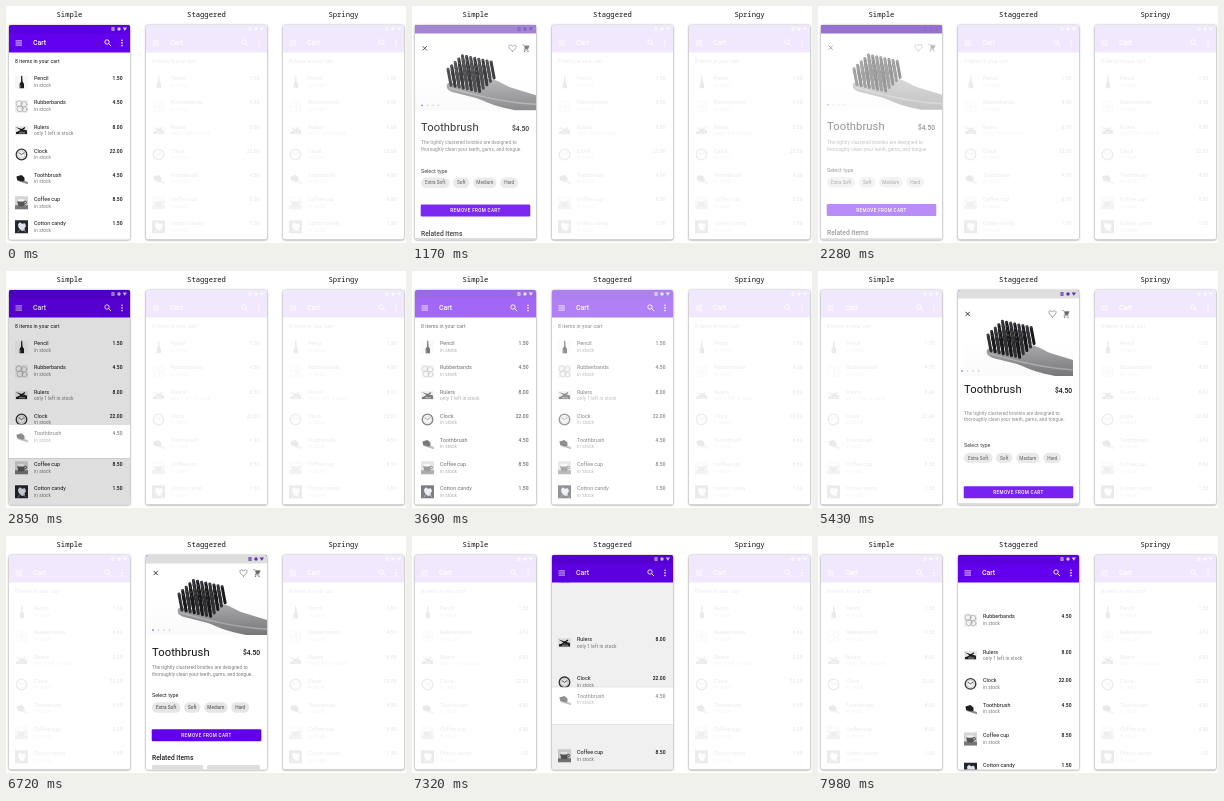
Animation, 400 px wide and 237 px high, one loop 8000 ms. Source, as an HTML page:

```html
<!DOCTYPE html>
<html lang="en">
<head>
<meta charset="utf-8">
<title>Cart transitions</title>
<style>
  html, body { margin: 0; height: 100%; overflow: hidden; background: #fff; }
  svg { display: block; width: 100vw; height: 100vh; font-family: Roboto, sans-serif; }
  .label { font: 7.2px "Noto Sans Mono", monospace; text-anchor: middle; fill: #111; }
  .name { font-size: 5.4px; fill: #111; }
  .note { font-size: 4.7px; letter-spacing: .08px; fill: #777; }
  .cost { font-size: 5px; font-weight: 500; text-anchor: end; fill: #111; }
  .line { fill: none; stroke-linecap: round; stroke-linejoin: round; }
</style>
</head>
<body>
<svg id="stage" viewBox="0 0 400 237" xmlns="http://www.w3.org/2000/svg"></svg>
<script>
const LOOP = 8000, W = 121, TOP = 19, BOTTOM = 233.5;
const PITCH = 24.1, ROW_TOP = 64, PAGE_TOP = 28, PICK = 4, GHOST = .09;
const CARD_ROW = ROW_TOP + PICK * PITCH;

const items = [
  ['Pencil', 'in stock', '1.50'],
  ['Rubberbands', 'in stock', '4.50'],
  ['Rulers', 'only 1 left in stock', '8.00'],
  ['Clock', 'in stock', '22.00'],
  ['Toothbrush', 'in stock', '4.50'],
  ['Coffee cup', 'in stock', '8.50'],
  ['Cotton candy', 'in stock', '1.50']
];

// Thumbnails, drawn in a 13 by 13 box
const thumbs = [
  `<path d="M0 0h13v13H0z" fill="#f6f6f6"/><path d="M6.2 0h1l.4 6 1.4 2v4.5H4.6V8L6 6z" fill="#1b1b1b"/><path d="M5.4 9v3" stroke="#777" stroke-width=".7"/>`,
  `<path d="M0 0h13v13H0z" fill="#f1f1f1"/><g class="line" stroke="#a8a8a8" stroke-width=".7"><circle cx="4" cy="4" r="3"/><circle cx="9" cy="4.5" r="2.8"/><circle cx="5" cy="9" r="3"/><circle cx="9.5" cy="9.5" r="2.6"/></g>`,
  `<path d="M0 2h13v9H0z" fill="#e9e9e9"/><path d="M.5 3.2L12 6.6v3.6H1V8l6-.8z" fill="#222"/><path d="M2 9.2l8-5.6" stroke="#111" stroke-width="1.2"/><path d="M4 8.9h6" stroke="#ccc" stroke-width=".7"/>`,
  `<circle cx="6.5" cy="6.5" r="5.3" fill="#f4f4f4" stroke="#333" stroke-width="1.3"/><circle cx="6.5" cy="6.5" r="3.6" class="line" stroke="#999" stroke-width=".6" stroke-dasharray=".5 1.4"/><path class="line" d="M4.2 5l2.3 1.6 2.6-1.9" stroke="#222" stroke-width=".7"/>`,
  `<path d="M2 6.2l9.5 3.2 1.5.8v2L2.5 9z" fill="#8c8c8c"/><path d="M1.4 4.4l5-1.4 3 2.4.2 3-2 1-5.4-1.6z" fill="#1f1f22"/>`,
  `<path d="M0 0h13v13H0z" fill="#d4d4d4"/><path d="M0 9h13v4H0z" fill="#777"/><path d="M2 4h8l-1 6H3.4z" fill="#555"/><ellipse cx="6" cy="4" rx="4" ry="1.3" fill="#f2f2f2"/><path class="line" d="M10 5q2.6 0 1.2 2.2l-1.7.8" stroke="#444"/>`,
  `<path d="M0 0h13v13H0z" fill="#23262e"/><path d="M3 4l2-2 2 1.5 3-.5 1 3-1.5 2 .5 2-3 .6L5 9 3.4 7z" fill="#dfe3ea"/><path d="M5 9l-2 3M8 9l3 3" stroke="#8b909b" stroke-width=".8"/>`
];

const clamp = v => Math.min(1, Math.max(0, v));
const ramp = (t, a, b) => clamp((t - a) / (b - a));
const ease = x => x < .5 ? 4 * x ** 3 : 1 - 4 * (1 - x) ** 3;
const glide = (t, a, b) => ease(ramp(t, a, b));
const mix = (a, b, p) => a + (b - a) * p;
const text = (x, y, s, attrs = '') => `<text x="${x}" y="${y}" ${attrs}>${s}</text>`;

const row = ([name, note, cost], i) => {
  const y = ROW_TOP + i * PITCH;
  return `<g transform="translate(6 ${y + 5.7})">${thumbs[i]}</g>` +
    text(25, y + 10.3, name, 'class="name"') +
    text(25, y + 17, note, 'class="note"') +
    text(113.5, y + 10.3, cost, 'class="cost"');
};

const statusIcons = color => `<g fill="${color}"><path d="M102.5 21.3h3v3.4h-3zm1 1v1.4h1v-1.4z" fill-rule="evenodd"/><circle cx="110" cy="23" r="1.7"/><path d="M113.6 21.5h4.4l-2.2 3.2z"/></g>`;

const header = `
  <path d="M0 19h${W}v27.5H0z" fill="#6200ee"/><path d="M0 19h${W}v8.5H0z" fill="#5900dc"/>
  ${statusIcons('#d9c8fa')}
  <path d="M6.5 34.9h6.5M6.5 37h6.5M6.5 39.1h6.5" stroke="#fff" stroke-width=".8"/>
  ${text(24, 39.4, 'Cart', 'font-size="6.9" font-weight="500" fill="#fff"')}
  <circle cx="98" cy="36" r="2.2" fill="none" stroke="#fff" stroke-width=".9"/><path d="M99.6 37.6l2.5 2.5" stroke="#fff" stroke-width="1"/>
  <g fill="#fff"><circle cx="113" cy="34.2" r=".8"/><circle cx="113" cy="36.9" r=".8"/><circle cx="113" cy="39.6" r=".8"/></g>`;

function brush() {
  let tufts = '';
  for (let j = 4; j >= 0; j--) for (let i = 0; i < 8; i++) {
    const x = 33 + i * 4.1 + j * 3.6, y = 30 + i * .9 - j * 3.4;
    tufts += `<path d="M${x} ${y}l3 16" stroke="${(i + j) % 2 ? '#19191c' : '#2e2e33'}" stroke-width="3"/>` +
      `<circle cx="${x}" cy="${y}" r=".8" fill="#4c4c52"/>`;
  }
  return `<path d="M32 45C34 42 40 44 48 46L74 40C82 40 86 44 95 48L121 56V71H100C85 68 76 65 62 59L38 53C32 51 31 48 32 45Z" fill="url(#handle)"/>
    <path class="line" d="M35 49L62 56C80 60 95 64 121 65" stroke="#c4c4c6" stroke-width="1.4" opacity=".6"/>
    <g class="line">${tufts}</g>`;
}

const chip = ([x, w, s]) => `<rect x="${x}" y="166.3" width="${w}" height="10.4" rx="5.2" fill="#e6e6e6"/>` +
  text(x + w / 2, 173.2, s, 'font-size="4.7" text-anchor="middle" fill="#444"');

const pageParts = id => ({
  photo: `<g clip-path="url(#photo${id})"><path d="M0 28h${W}v71.5H0z" fill="url(#paper)"/><g transform="translate(0 28)">${brush()}</g></g>
    ${[0, 1, 2, 3].map(i => `<circle cx="${7 + i * 5.5}" cy="94" r=".7" fill="${i ? '#bbb' : '#6200ee'}"/>`).join('')}`,
  close: `<path d="M7.6 34.9l4.2 4.2m0-4.2l-4.2 4.2" stroke="#222" stroke-width=".9"/>`,
  icons: `<path class="line" d="M97.5 40.2C92 36 94 33.4 95.6 33.8q1.3.2 1.9 1.4q.6-1.2 1.9-1.4C101 33.4 103 36 97.5 40.2z" stroke="#666" stroke-width=".6"/>
    <path d="M107.3 33.6h1.4l.5 1h5l-1.5 3.3h-3.2l-.6 1h4.5" fill="none" stroke="#666" stroke-width=".6"/><path d="M109.3 34.8h4.8l-1.4 2.9h-2.9z" fill="#666"/><circle cx="109.5" cy="40.2" r=".7" fill="#666"/><circle cx="113" cy="40.2" r=".7" fill="#666"/>`,
  title: text(6, 119.5, 'Toothbrush', 'font-size="11.2" letter-spacing=".08" fill="#111"') +
    text(114, 119.4, '$4.50', 'font-size="6.7" font-weight="500" text-anchor="end" fill="#111"'),
  about: text(6, 133.2, 'The tightly clustered bristles are designed to', 'class="note"') +
    text(6, 139.9, 'thoroughly clean your teeth, gums, and tongue.', 'class="note"'),
  type: text(6, 161.4, 'Select type', 'font-size="5.4" fill="#222"'),
  chips: [[6, 28.5, 'Extra Soft'], [38, 16.5, 'Soft'], [58.2, 23.3, 'Medium'], [85.2, 18, 'Hard']].map(chip).join(''),
  button: `<rect x="5.7" y="193.2" width="109.6" height="12" rx="1.2" fill="#6200ee"/>` +
    text(60.5, 200.9, 'REMOVE FROM CART', 'font-size="4.6" font-weight="500" letter-spacing=".35" text-anchor="middle" fill="#fff"'),
  related: text(6, 224.3, 'Related Items', 'font-size="6.7" font-weight="500" fill="#222"') +
    `<rect x="6" y="229" width="51" height="20" rx="1.5" fill="#ddd"/><rect x="61" y="229" width="53" height="20" rx="1.5" fill="#ddd"/>`
});

function phoneMarkup(x, label, id) {
  const parts = Object.entries(pageParts(id))
    .map(([key, body]) => `<g id="${key}${id}">${body}</g>`).join('');
  return `${text(x + 60.5, 11, label, 'class="label"')}
  <g transform="translate(${x} 0)">
    <rect y="19.6" width="${W}" height="${BOTTOM - TOP}" rx="2" fill="#777" filter="url(#soft)"/>
    <rect y="${TOP}" width="${W}" height="${BOTTOM - TOP}" rx="2" fill="#fff"/>
    <clipPath id="card${id}"><rect id="cut${id}" width="${W}"/></clipPath>
    <clipPath id="photo${id}"><rect id="crop${id}" y="28" height="71.5"/></clipPath>
    <g id="screen${id}" clip-path="url(#phone)">
      <path d="M0 19h${W}v215H0z" fill="#fff"/>
      <g id="count${id}">${text(6, 57, '8 items in your cart', 'font-size="5.1" letter-spacing=".06" fill="#111"')}</g>
      ${items.map((item, i) => `<g id="row${i}${id}">${row(item, i)}</g>`).join('')}
      ${header}
      <g id="status${id}"><path d="M0 19h${W}v9H0z" fill="#fff"/>${statusIcons('#6a35c8')}</g>
      <path id="scrim${id}" d="M0 19h${W}v215H0z"/>
      <path id="veil${id}" d="M0 27.5h${W}v204H0z" fill="#fff"/>
      <g id="sheet${id}">
        <rect id="edge${id}" x="-1" width="${W + 2}" fill="none" stroke="#000"/>
        <g clip-path="url(#card${id})">
          <path d="M0 19h${W}v215H0z" fill="#fff"/>
          <g id="pick${id}">${row(items[PICK], PICK)}</g>${parts}
        </g>
      </g>
    </g>
  </g>`;
}

const stage = document.getElementById('stage');
stage.innerHTML = `<defs>
  <filter id="soft" x="-10%" y="-10%" width="120%" height="120%"><feGaussianBlur stdDeviation="1"/></filter>
  <clipPath id="phone"><rect y="${TOP}" width="${W}" height="${BOTTOM - TOP}" rx="2"/></clipPath>
  <linearGradient id="handle" x2="0" y2="1"><stop stop-color="#a9a9ab"/><stop offset="1" stop-color="#77777a"/></linearGradient>
  <linearGradient id="paper" x2="0" y2="1"><stop offset=".5" stop-color="#fff"/><stop offset="1" stop-color="#fafafa"/></linearGradient>
</defs>` + phoneMarkup(3, 'Simple', 'A') + phoneMarkup(140, 'Staggered', 'B') + phoneMarkup(277, 'Springy', 'C');

const parts = {};
stage.querySelectorAll('[id]').forEach(el => parts[el.id] = el);
const set = (id, attrs) => { for (const k in attrs) parts[id].setAttribute(k, attrs[k]); };
const place = (id, y, opacity = 1, x = 0) => set(id, { transform: `translate(${x} ${y})`, opacity });

// open: card growth, spread: distance of rows from the picked one
function drawPhone(id, { alpha = 1, open = 0, spread = 0, scrim = 0, status = 0, pick = 1, page = {} }) {
  set('screen' + id, { opacity: alpha });
  items.forEach((_, i) => {
    const d = i - PICK;
    place(`row${i}${id}`, spread * (d < 0 ? d ** 3 : 10.5 * d));
  });
  place('count' + id, spread * -125);
  set('status' + id, { opacity: status });
  set('scrim' + id, { opacity: scrim });
  const veil = ramp(open, .75, .95);
  set('veil' + id, { opacity: veil });
  set('sheet' + id, { display: open > 0 ? 'inline' : 'none' });
  if (!open) return;

  const top = mix(CARD_ROW, PAGE_TOP, open);
  const height = mix(CARD_ROW + PITCH, BOTTOM + .5, open) - top;
  set('cut' + id, { y: top, height });
  set('edge' + id, { y: top, height, 'stroke-opacity': .16 * (1 - veil) });
  place('pick' + id, top - CARD_ROW, pick);
  const inset = page.inset || 0;
  set('crop' + id, { x: 1.5 * inset, width: W - 2 * inset });
  for (const key of ['photo', 'close', 'icons', 'title', 'about', 'type', 'chips', 'button', 'related']) {
    const [y, opacity] = page.at(key, top - PAGE_TOP);
    place(key + id, y, opacity, key === 'photo' || key === 'icons' ? -inset / 2 : 0);
  }
}

function simple(t) {
  const back = t >= 2070;
  const fade = back ? 1 - ramp(t, 2070, 2450) : ramp(t, 700, 1260);
  return {
    alpha: mix(1, GHOST, ramp(t, 3570, 3840)),
    open: back ? 1 - glide(t, 2070, 3090) : glide(t, 300, 1410),
    scrim: .13 * ramp(t, 300, 650) * (1 - ramp(t, 2850, 3090)),
    status: back ? 1 - ramp(t, 2070, 2500) : ramp(t, 810, 1410),
    pick: back ? ramp(t, 2600, 3090) : 1 - ramp(t, 300, 650),
    page: { at: (key, shift) => [shift, fade] }
  };
}

const lag = { about: 15.6, type: 21.6, chips: 23, button: 33, related: 38 };

function staggered(t) {
  const back = t >= 6720;
  const open = back ? 1 - glide(t, 6720, 7530) : glide(t, 4387, 5732);
  const rest = back ? glide(t, 6720, 7530) : 1 - glide(t, 4900, 6120);
  const out = 1 - ramp(t, 6720, 7100);
  const at = (key, shift) => {
    if (key in lag) return [lag[key] * rest, out * ramp(t, 5000, 5500)];
    return [shift * (key === 'title' ? .4 : 1), out * ramp(t, 4800, 5250)];
  };
  return {
    alpha: mix(GHOST, 1, ramp(t, 3570, 3840)),
    open,
    spread: back ? 2.2 * Math.exp((7450 - Math.max(t, 7450)) / 408) : .22 * (Math.max(0, t - 4320) / 330) ** 2,
    scrim: .13 * ramp(t, 4400, 4900) * (1 - ramp(t, 7100, 7500)),
    status: back ? 1 - ramp(t, 6720, 7150) : ramp(t, 4900, 5400),
    pick: back ? ramp(t, 7150, 7500) : 1 - ramp(t, 4620, 4900),
    page: { at, inset: 6 * clamp((1 - open) / .045) }
  };
}

function render(t) {
  drawPhone('A', simple(t));
  drawPhone('B', staggered(t));
}

drawPhone('C', { alpha: GHOST });
const start = performance.now();
(function tick() {
  render((performance.now() - start) % LOOP);
  requestAnimationFrame(tick);
})();
</script>
</body>
</html>
```
